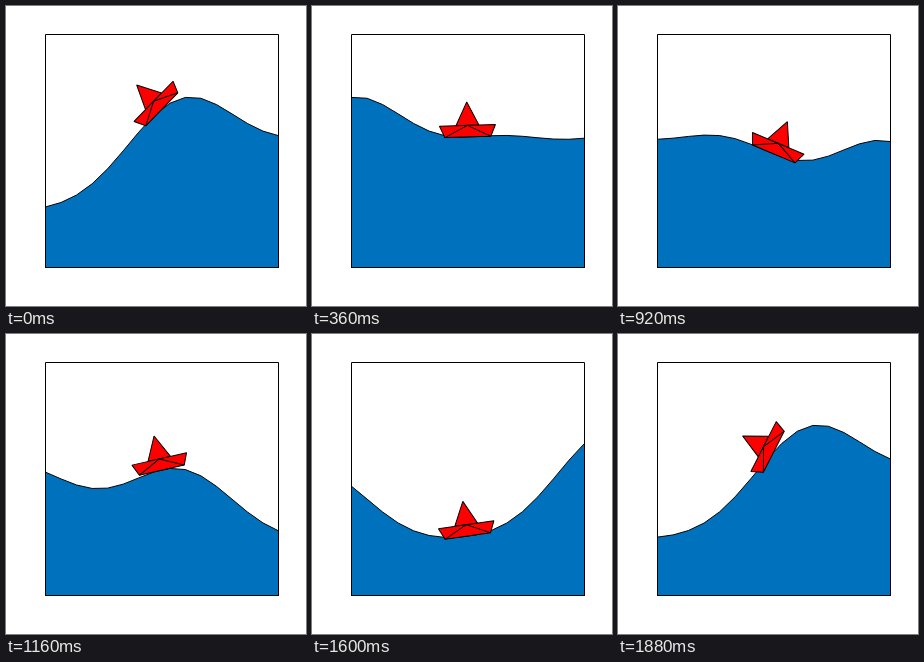
Animation, 300 px wide and 300 px high, one loop 1920 ms. Source, as an HTML page with a canvas:

```html
<!DOCTYPE html>
<html>
<head>
<meta charset="utf-8">
<title>Paper boat on a wave</title>
<style>
html, body { margin: 0; width: 100%; height: 100%; overflow: hidden; background: #fff; }
canvas { display: block; }
</style>
</head>
<body>
<canvas id="stage" width="300" height="300"></canvas>
<script>
const ctx = document.getElementById('stage').getContext('2d');
const LEFT = 39.5, TOP = 28.5, SIZE = 233;
const SEGMENTS = 15, STEP = SIZE / SEGMENTS;
const STEPS = 48, STEP_MS = 40;
const RAD = Math.PI / 180;

// harmonic, amplitude in px, phase in degrees
const WAVES = [[1, 29.6, 40.8], [2, 23.7, 22.7], [3, 17.5, 3.5], [5, 6.4, -149.3]];

function waveY(j) {
  return WAVES.reduce(
    (y, [m, amp, phase]) => y + amp * Math.cos((m * j * 360 / STEPS + phase) * RAD),
    144.7);
}

function path(points, fill, closed = true) {
  ctx.beginPath();
  points.forEach(([x, y]) => ctx.lineTo(x, y));
  if (closed) ctx.closePath();
  if (fill) {
    ctx.fillStyle = fill;
    ctx.fill();
  }
  ctx.stroke();
}

function drawSea(n) {
  const bottom = TOP + SIZE;
  const points = [[LEFT, bottom]];
  for (let k = 0; k <= SEGMENTS; k++) points.push([LEFT + k * STEP, waveY(n + k)]);
  points.push([LEFT + SIZE, bottom]);
  path(points, '#0072bd');
}

// The boat rides the middle segment; its tilt in radians is the slope there.
function drawBoat(n) {
  const a = waveY(n + 7), b = waveY(n + 8);
  ctx.save();
  ctx.translate(155.8, (a + b) / 2);
  ctx.rotate(1.02 * (b - a) / STEP);
  path([[-11.5, -11.5], [0, -35], [11.5, -11.5]], '#f00');
  path([[-23, 0], [-28, -11.5], [28, -11.5], [23, 0]], '#f00');
  path([[-23, 0], [0, -11.5], [23, 0]], null, false);
  ctx.restore();
}

function draw(n) {
  ctx.fillStyle = '#fff';
  ctx.fillRect(0, 0, 300, 300);
  ctx.strokeStyle = '#000';
  ctx.lineWidth = 1;
  ctx.lineJoin = 'bevel';
  drawSea(n);
  drawBoat(n);
  ctx.strokeRect(LEFT, TOP, SIZE, SIZE);
}

let start = null;
function tick(now) {
  if (start === null) start = now;
  draw(Math.floor((now - start) / STEP_MS) % STEPS);
  requestAnimationFrame(tick);
}
draw(0);
requestAnimationFrame(tick);
</script>
</body>
</html>
```
